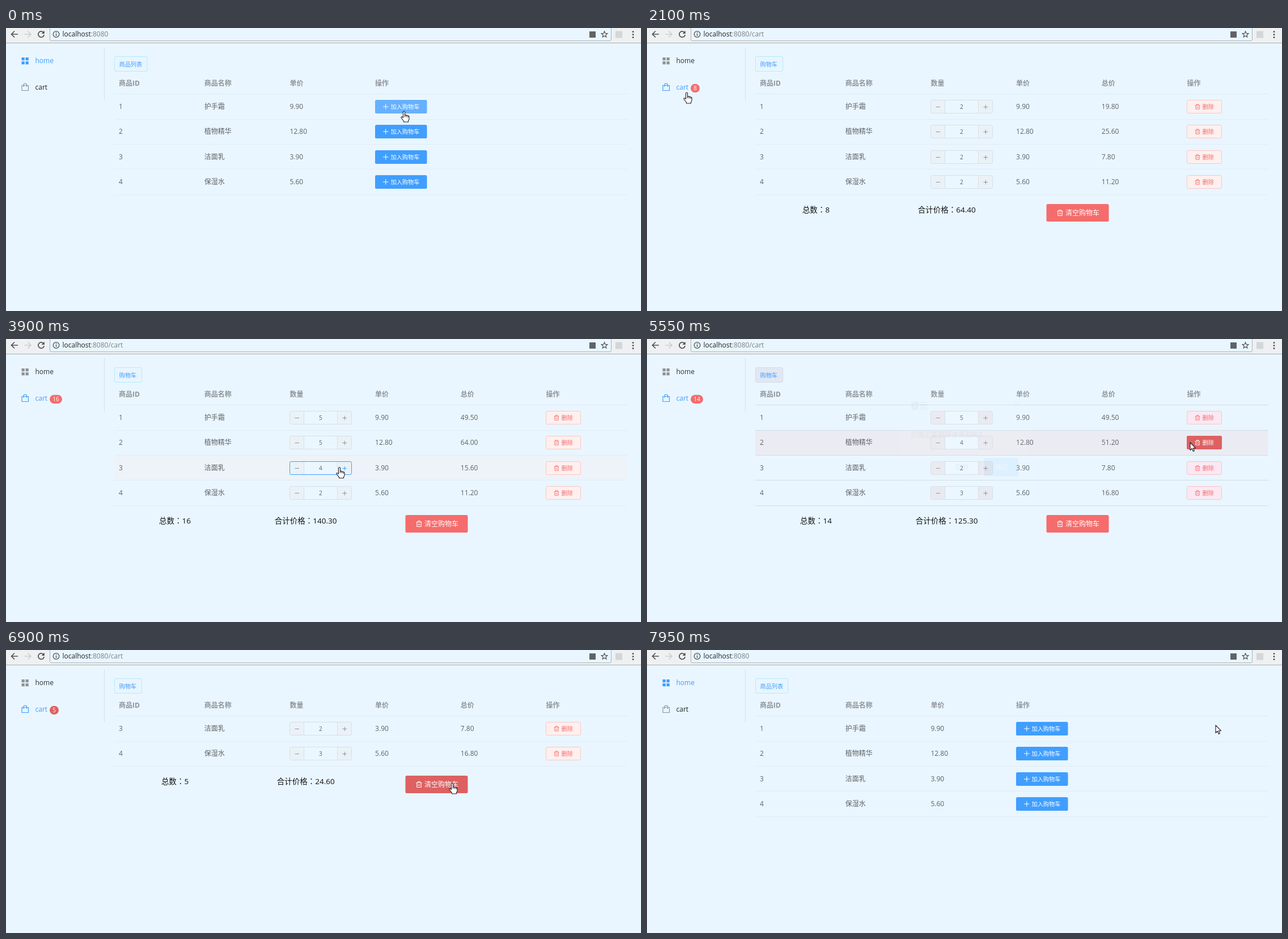
Write an HTML page that moves like this. It is 1120x500 px and loops after 8.1 s.

```html
<!DOCTYPE html>
<html lang="zh-CN">
<head>
<meta charset="utf-8">
<title>购物车</title>
<style>
html, body { margin: 0; width: 100%; height: 100%; overflow: hidden; background: #e9f6ff; }
svg { display: block; width: 1120px; height: 500px; }
text { font-family: "Open Sans", "Noto Sans CJK SC", "Noto Sans CJK", sans-serif; white-space: pre; }
.colon { font-family: "Noto Sans CJK TC", "Noto Sans CJK", sans-serif; }
.rule { stroke: #e1edf4; }
.dim .rule { stroke: #d3dce4; }
.dim .tag { fill: #e1e8f3; stroke: #d0dbe8; }
.dim .del { fill: #fbe8f3; }
.dim .band { fill: #ebebf3; }
.dim .step { fill: #e8eaf1; }
</style>
</head>
<body>
<svg viewBox="0 0 1120 500">
  <g id="bar">
    <rect width="1120" height="26" fill="#eef0f2"/>
    <path d="M0 26.5H1120" stroke="#a8afb4"/>
    <path d="M77.5 0V20Q77.5 22.5 80 22.5H1065Q1067.5 22.5 1067.5 20V0" fill="#e9f6ff" stroke="#aeb3b7"/>
    <g fill="none" stroke="#505356" stroke-width="1.7">
      <path id="arrow" d="M21 11H10M15 5.5L9.5 11L15 16.5"/>
      <path d="M32.5 11H43.5M38.5 5.5L44 11L38.5 16.5" stroke="#cdd0d2"/>
      <path d="M66.3 8A5.2 5.2 0 1 0 67.2 12"/>
    </g>
    <path d="M67.8 4.8V10H62.6Z" fill="#505356"/>
    <circle cx="88.5" cy="11" r="5.3" fill="none" stroke="#505356" stroke-width="1.3"/>
    <path d="M88.5 10V14M88.5 7.5V9" stroke="#505356" stroke-width="1.4"/>
    <rect x="1029" y="6" width="11" height="11" fill="#606366"/>
    <path id="star" fill="none" stroke="#505356" stroke-width="1.2"/>
    <rect x="1075" y="5.5" width="12" height="12" fill="#d3d7d9"/>
    <path d="M1106 6.5h0m0 5h0m0 5h0" stroke="#505356" stroke-width="3" stroke-linecap="round"/>
  </g>
  <g id="page"></g>
</svg>
<script>
const STEP = 150, COUNT = 54;
const BLUE = '#409eff', RED = '#f56c6c', DARK_RED = '#dd6161', INK = '#606266', GREY = '#909399';
const ROW = 44.4, TOP = 116.6;
const goods = [['护手霜', 9.9], ['植物精华', 12.8], ['洁面乳', 3.9], ['保湿水', 5.6]];

// where the pointer rests on each control
const spots = {
  add: r => [702, 147 + r * ROW],
  plus: r => [588, 138 + r * ROW],
  minus: r => [513, 138 + r * ROW],
  del: r => [971 - 13 * r, 128 + 55 * r],
  ok: () => [625, 238],
  clear: () => [787, 235],
  cart: () => [70, 114],
  home: () => [60, 55],
  rest: () => [1003, 133]
};
// control, row, steps stayed, steps to get there
let clock = 0;
const visits = [
  ...goods.map((g, r) => ['add', r, 2]),
  ['cart', 0, 2, 5],
  ['plus', 0, 3, 4], ['plus', 1, 3], ['plus', 2, 2, 2], ['plus', 3, 1],
  ['minus', 2, 2, 3], ['minus', 1, 1, 2],
  ['del', 1, 2, 3], ['ok', 1, 1, 2],
  ['del', 0, 2], ['ok', 0, 1, 2],
  ['clear', 0, 2, 3], ['ok', -1, 1, 3],
  ['home', 0, 1, 2], ['rest', 0, 1]
].map(([name, row, stay, travel = 1]) => {
  const at = clock + travel, [x, y] = spots[name](row);
  clock = at + stay - 1;
  return { name, row, stay, at, leave: clock, x, y };
});

function stateAt(k) {
  const qty = goods.map(() => 0);
  let cart = false, now = visits[0];
  for (const v of visits) {
    if (v.at > k) break;
    now = v;
    const n = Math.min(v.stay, k - v.at + 1);
    if (v.name === 'add' || v.name === 'plus') qty[v.row] += n;
    if (v.name === 'minus') qty[v.row] -= n;
    if (v.name === 'ok') goods.forEach((g, i) => { if (v.row < 0 || v.row === i) qty[i] = 0; });
    if (v.name === 'cart') cart = true;
    if (v.name === 'home') cart = false;
  }
  const next = visits[visits.indexOf(now) + 1] || now;
  const f = next === now ? 0 : Math.max(0, (k - now.leave) / (next.at - now.leave));
  const go = c => now[c] + (next[c] - now[c]) * Math.min(f, 1);
  const pressed = now.name === 'del' || now.name === 'clear';
  return {
    qty, cart, pressed,
    total: qty.reduce((a, b) => a + b),
    clearing: now.name === 'clear',
    open: pressed ? Math.min(1, ((k - now.at) / 2) ** 4) : 0,
    p: k < now.at ? now : { x: go('x'), y: go('y') }
  };
}

const txt = (x, y, s, fill = INK, size = 12, more = '') =>
  `<text x="${x}" y="${y + size * .37}" font-size="${size}" fill="${fill}" ${more}>${s}</text>`;
const box = (x, y, w, h, fill, stroke = 'none', more = '') =>
  `<rect x="${x}" y="${y}" width="${w}" height="${h}" rx="2.6" fill="${fill}" stroke="${stroke}" ${more}/>`;
const line = (d, color, more = '') => `<path d="${d}" fill="none" stroke="${color}" ${more}/>`;
const rule = y => line(`M191 ${Math.floor(y) + .5}H1096`, '', 'class="rule"');
const mid = 'text-anchor="middle"';
const colon = '<tspan class="colon" lang="zh-TW">：</tspan>';
const col = i => 199 + i * 150.7;
const over = (p, x, y, w, h) => p.x >= x && p.x <= x + w && p.y >= y && p.y <= y + h;

const trash = (x, y, color, s) => `<g transform="translate(${x} ${y}) scale(${s})">` +
  line('M-5 -3H5M-2 -3V-5H2V-3M-3.8 -3V5H3.8V-3M-1.3 -.5V2.8M1.3 -.5V2.8', color) + '</g>';

function menu({ cart, total, clearing }) {
  const home = cart ? GREY : BLUE, bag = cart ? BLUE : GREY;
  let s = line('M173.5 34V128', '#d3e0e8');
  for (const x of [27.5, 34.5]) for (const y of [52, 59])
    s += `<rect x="${x}" y="${y}" width="5.3" height="5.3" rx=".6" fill="${home}"/>`;
  s += txt(51.5, 58, 'home', cart ? '#303133' : BLUE);
  s += line('M28 101.5H39.5V110.5H28ZM31 104V100.5Q31 98 33.7 98Q36.5 98 36.5 100.5V104', bag, 'stroke-width="1.2"');
  s += txt(51.5, 104.7, 'cart', cart ? BLUE : '#222');
  if (total) {
    const w = total > 9 ? 22 : 16;
    s += `<rect x="77" y="98.7" width="${w}" height="15.4" rx="7.7" fill="${clearing ? DARK_RED : RED}"/>`;
    s += txt(77 + w / 2, 106.6, total, '#fff', 10.2, mid);
  }
  return s;
}

const heading = (tag, w, heads) =>
  box(191.5, 50.5, w, 26, '#e8f5ff', '#b5eaf8', 'class="tag"') + txt(199.5, 64, tag, BLUE, 10.2) +
  heads.map((h, i) => txt(col(i), 97.4, h, GREY, 12, 'font-weight="700"')).join('') + rule(TOP);

function shop({ p }) {
  let hand = false;
  let s = heading('商品列表', 57.5, ['商品ID', '商品名称', '单价', '操作']);
  goods.forEach(([name, price], i) => {
    const y = Math.round(139 + i * ROW), hit = over(p, 651, y - 12, 91, 24);
    hand = hand || hit;
    [i + 1, name, price.toFixed(2)].forEach((v, c) => { s += txt(col(c), y, v); });
    s += box(651, y - 12, 91.5, 24, hit ? '#66b1ff' : BLUE);
    s += line(`M665 ${y}H674.5M669.75 ${y - 4.7}V${y + 4.7}`, '#fff');
    s += txt(678.5, y, '加入购物车', '#fff', 10.2) + rule(TOP + (i + 1) * ROW);
  });
  return { s, hand };
}

function counter(y, n, side) {
  const edge = side ? BLUE : '#d9dfe5', tone = on => on ? BLUE : GREY;
  return box(500.5, y - 11.5, 109, 23, '#ebf7ff') +
    `<path class="step" d="M501 ${y - 11}h24.5v22H501ZM584.5 ${y - 11}H609v22H584.5Z" fill="#eaf2f7"/>` +
    line(`M525.5 ${y - 11}v22M584.5 ${y - 11}v22`, '#d9dfe5') +
    box(500.5, y - 11.5, 109, 23, 'none', edge) +
    line(`M509.5 ${y + .5}h7.5`, tone(side < 0)) +
    line(`M593.5 ${y + .5}h7.5M597.25 ${y - 3.2}v7.4`, tone(side > 0)) +
    txt(555, y, n, INK, 10.2, mid);
}

function cartPage({ p, qty, total, open, pressed }) {
  let hand = false, sum = 0, n = 0;
  let s = heading('购物车', 48, ['商品ID', '商品名称', '数量', '单价', '总价', '操作']);
  goods.forEach(([name, price], i) => {
    if (!qty[i]) return;
    const y = Math.round(139 + n * ROW), cost = price * qty[i], top = TOP + n * ROW;
    const plus = over(p, 584, y - 12, 26, 24), minus = over(p, 500, y - 12, 26, 24);
    const del = over(p, 952, y - 12, 62, 24), ink = del ? '#fff' : RED;
    sum += cost;
    n++;
    hand = hand || plus || minus;
    if (over(p, 191, top, 905, ROW - .1) && open < .1)
      s += `<rect class="band" x="191" y="${top}" width="904" height="${ROW}" fill="#edf3f8"/>`;
    s += rule(top) + txt(col(0), y, i + 1) + txt(col(1), y, name) + counter(y, qty[i], plus - minus);
    s += txt(col(3), y, price.toFixed(2)) + txt(col(4), y, cost.toFixed(2));
    s += del ? box(952, y - 12, 62, 24, pressed ? DARK_RED : RED)
             : box(952.5, y - 11.5, 61, 23, '#fdf0ee', '#fac6c6', 'class="del"');
    s += trash(971, y, ink, .85) + txt(979.5, y, '删除', ink, 10.2) + rule(top + ROW);
  });
  const end = Math.round(TOP + n * ROW), clear = over(p, 705, end + 17, 110, 31);
  s += txt(298, end + 27, `总数${colon}${total}`, '#111', 13.5, mid);
  s += txt(528.7, end + 27, `合计价格${colon}${sum.toFixed(2)}`, '#111', 13.5, mid);
  s += box(704.5, end + 17, 110, 31, clear && pressed ? DARK_RED : RED);
  s += trash(728.5, end + 32.5, '#fff', 1) + txt(738, end + 32.5, '清空购物车', '#fff');
  return { s, hand: hand || clear };
}

function dialog({ open, clearing }) {
  const ask = clearing ? '您确定要清空购物车吗？' : '您确定要删除该商品吗？';
  return `<rect y="27" width="1120" height="473" opacity="${.5 * open * open}"/>` +
    `<g opacity="${open}" transform="translate(0 ${-17 * (1 - open)})">` +
    box(448, 107, 224, 169, '#fff') + txt(465, 134, '提示', '#303133', 15.4) +
    line('M648 126l7 7m0 -7l-7 7', GREY) + txt(465, 185, ask) +
    box(525.5, 226, 60, 33, '#fff', '#dcdfe6') + txt(555.5, 242.5, '取消', INK, 12, mid) +
    box(594.5, 226, 60.5, 33, BLUE) + txt(625, 242.5, '确定', '#fff', 12, mid) + '</g>';
}

function cursor(p, hand) {
  const d = hand
    ? 'M-1.5 1.5Q-1.5 0 0 0Q1.5 0 1.5 1.5V7Q3 6 4.3 7.5Q6 6.5 7 8.3Q9 7.8 9 10V13Q9 15.5 7.5 17V19H-.5V17.5L-4.7 12Q-5.5 10.5 -4.5 10Q-3.3 9.5 -1.5 11.5ZM1.5 7V10M4.3 7.5V10.5M7 8.3V11'
    : 'M0 0V13.5L3.2 10.5L5.4 15.5L7.4 14.6L5.3 9.7H9.5Z';
  return `<path transform="translate(${p.x} ${p.y})" d="${d}" fill="#fff" stroke="#1c1c28" stroke-width="1.1" stroke-linejoin="round"/>`;
}

const star = Array.from({ length: 10 }, (v, i) => {
  const r = i % 2 ? 2.5 : 5.6, a = i * Math.PI / 5;
  return `${1055.5 + r * Math.sin(a)} ${11.4 - r * Math.cos(a)}`;
});
document.getElementById('star').setAttribute('d', `M${star.join('L')}Z`);
const page = document.getElementById('page');

function draw(k) {
  const st = stateAt(k), { p, cart, open } = st;
  const view = cart ? cartPage(st) : shop(st);
  const onMenu = over(p, 20, 40, 150, 36) || over(p, 20, 88, 150, 36);
  const hand = open ? over(p, 594, 226, 61, 33) : view.hand || onMenu;
  page.setAttribute('class', open ? 'dim' : '');
  page.innerHTML =
    txt(99.5, 11, `localhost<tspan fill="#7c8084">:8080${cart ? '/cart' : ''}</tspan>`, '#222') +
    menu(st) + view.s + (open ? dialog(st) : '') + cursor(p, hand);
}

let last = -1;
function tick() {
  const k = Math.floor(performance.now() / STEP) % COUNT;
  if (k !== last) draw(last = k);
  requestAnimationFrame(tick);
}
tick();
</script>
</body>
</html>
```
